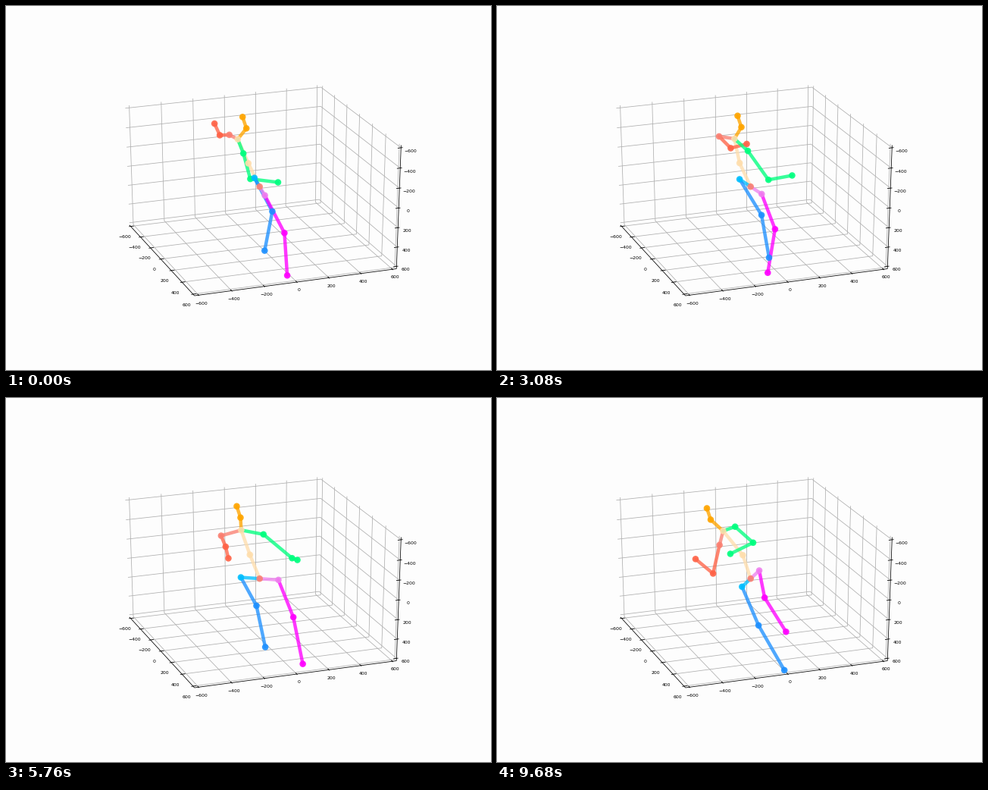
Write a matplotlib script that moves like this. It is 640 by 480 pixels and loops after 9.72 s.

```python
import numpy as np
import matplotlib.pyplot as plt
from matplotlib.animation import FuncAnimation
from matplotlib.collections import LineCollection

W, H, DPI = 640, 480, 100
STEP, FRAMES = 40, 243
LOOP = STEP * FRAMES / 1000
TAU = 2 * np.pi

# ---------- camera ----------
ELEV, AZIM = np.radians(26.2), np.radians(20)
DIST, FLAT = 12, 0.857
CENTRE = np.array([335, 238.3])
FOCAL = np.array([268.1, 199.8]) * DIST


def project(x, y, z):
    """Box coordinates in -0.5..0.5 (y towards the viewer, z down) to pixels."""
    right = x * np.cos(AZIM) + y * np.sin(AZIM)
    near = y * np.cos(AZIM) - x * np.sin(AZIM)
    z = z * FLAT
    down = z * np.cos(ELEV) + near * np.sin(ELEV)
    depth = DIST - near * np.cos(ELEV) + z * np.sin(ELEV)
    return CENTRE + FOCAL * np.array([right, down]) / depth


def path(*points):
    return [project(*p) for p in points]


fig = plt.figure(figsize=(W / DPI, H / DPI), dpi=DPI, facecolor="#fdfdfd")
ax = fig.add_axes([0, 0, 1, 1])
ax.set_xlim(0, W)
ax.set_ylim(H, 0)
ax.axis("off")

# ---------- box, ticks and labels ----------
M = 25 / 48                 # box edge, a little beyond the last tick
PAD = M + 0.034             # label distance
OUT, IN = M + 0.009, M - 0.017
grid, dark = [], []


def label(value, point):
    ax.text(*point, str(value).replace("-", "\u2212"), fontsize=4.4,
            family="DejaVu Sans", ha="center", va="top", color="black")


for value in range(-600, 601, 200):
    v = value / 1200
    grid += [path((v, M, M), (v, -M, M), (v, -M, -M)),
             path((-M, v, M), (M, v, M), (M, v, -M)),
             path((-M, -M, v), (M, -M, v), (M, M, v))]
    dark += [path((v, OUT, M), (v, IN, M)),
             path((-OUT, v, M), (-IN, v, M)),
             path((OUT, M, v), (IN, M, v))]
    label(value, project(v, PAD, PAD))
    label(value, project(-PAD, v, PAD + 0.035))
    label(value, project(PAD, PAD, v))

dark += [path((-M, M, M), (M, M, M)),
         path((-M, -M, M), (-M, M, M)),
         path((M, M, -M), (M, M, M))]
ax.add_collection(LineCollection(grid, colors="#b0b0b0", linewidths=0.57, zorder=1))
ax.add_collection(LineCollection(dark, colors="black", linewidths=0.57, zorder=2))

# ---------- walk: heading in degrees and gait in cycles, at key times ----------
KEYS = [0, 2.16, 3.92, 5.76, 7.04, 8.52, 9.68]
HEADING = [74, 70, 40, 8, -25, -59, -63]
GAIT = [0.2, 1.38, 1.85, 2.25, 2.78, 3.44, 3.82]


def vec(x, y):
    return np.array([x, y], float)


def ease(u):
    u = np.clip(u, 0, 1)
    return u * u * (3 - 2 * u)


def leg(hip, phase, ahead):
    """Knee and foot: the foot swings along the heading and lifts on its way forward."""
    lift = max(0, -np.sin(TAU * phase))
    stride = 27 * np.cos(TAU * phase) - 13
    foot = vec(34, 105 - (20 - 8 * ahead[0]) * lift) + stride * ahead
    knee = 0.48 * foot + vec(3, 0) + (9 + 6 * lift) * ahead
    return hip + knee, hip + foot


def pose(t):
    turn = np.radians(np.interp(t, KEYS, HEADING))
    gait = np.interp(t, KEYS, GAIT)
    c, s = np.cos(turn), np.sin(turn)
    ahead = vec(s, -0.45 * c)
    back = 1 - ease((t - 0.5) / 1.5)            # opening back-swing of the arms
    hang = np.exp(-((t - 5.6) / 0.9) ** 2)      # red arm hangs straight for a moment

    j = {"root": vec(334.7, 238.2)}
    j["spine"] = j["root"] + vec(-12.5 - 2.5 * s, -30.5 - c)
    sway = 5 * np.sin(TAU * (t / LOOP - 0.2))
    j["neck"] = j["root"] + vec(-28 + 4 * s + sway, -62 - 2 * c)
    j["nose"] = j["neck"] + vec(-3 + 15 * s, -13.5 - 3 * c)
    j["head"] = j["nose"] + vec(-5, -15)

    twist = turn - 0.21 * c
    chest = j["neck"] + vec(2 - 4 * s, 6.5)
    half = vec(28 * np.cos(twist), 13 * np.sin(twist))
    j["sh_g"], j["sh_r"] = chest + half, chest - half
    j["el_g"] = j["sh_g"] + vec(12 + 26 * c - 10 * back, 30 + 10 * s - 6 * back)
    j["wr_g"] = j["el_g"] + vec(2 + 36 * s, 4 - 12 * s + 12 * back)
    j["el_r"] = j["sh_r"] + vec(4 + 14 * s - 30 * back, 26 - 13 * s - 13 * back - 10 * hang)
    j["wr_r"] = j["el_r"] + vec(26 * s - 32 * back, -12 + 8 * s - 11 * back + 27 * hang)

    hip = vec(25 * c, 12 * s)
    j["hip_m"], j["hip_b"] = j["root"] + hip, j["root"] - hip
    j["kn_m"], j["ft_m"] = leg(j["hip_m"], gait, ahead)
    j["kn_b"], j["ft_b"] = leg(j["hip_b"], gait + 0.5, ahead)
    return j


# ---------- skeleton: chains of joints, each with the colour of its bone and dot ----------
CHAINS = [
    ("root", [("spine", "navajowhite"), ("neck", "navajowhite"), ("nose", "orange"), ("head", "orange")]),
    ("neck", [("sh_r", "salmon"), ("el_r", "tomato"), ("wr_r", "tomato")]),
    ("neck", [("sh_g", "springgreen"), ("el_g", "springgreen"), ("wr_g", "springgreen")]),
    ("root", [("hip_b", "deepskyblue"), ("kn_b", "dodgerblue"), ("ft_b", "dodgerblue")]),
    ("root", [("hip_m", "violet"), ("kn_m", "magenta"), ("ft_m", "magenta")]),
]
bones, dots = [], {"root": "salmon"}
for start, chain in CHAINS:
    for end, colour in chain:
        bones.append((start, end, colour))
        dots[end] = colour
        start = end

lines = LineCollection([], colors=[c for _, _, c in bones], linewidths=3.2,
                       alpha=0.78, capstyle="round", zorder=3)
ax.add_collection(lines)
marks = ax.scatter(np.zeros(len(dots)), np.zeros(len(dots)), s=38,
                   c=list(dots.values()), linewidths=0, alpha=0.9, zorder=4)


def draw(frame):
    j = pose(frame * STEP / 1000)
    lines.set_segments([[j[a], j[b]] for a, b, _ in bones])
    marks.set_offsets([j[name] for name in dots])
    return lines, marks


anim = FuncAnimation(fig, draw, frames=FRAMES, interval=STEP, repeat=True, repeat_delay=0)
plt.show()
```
